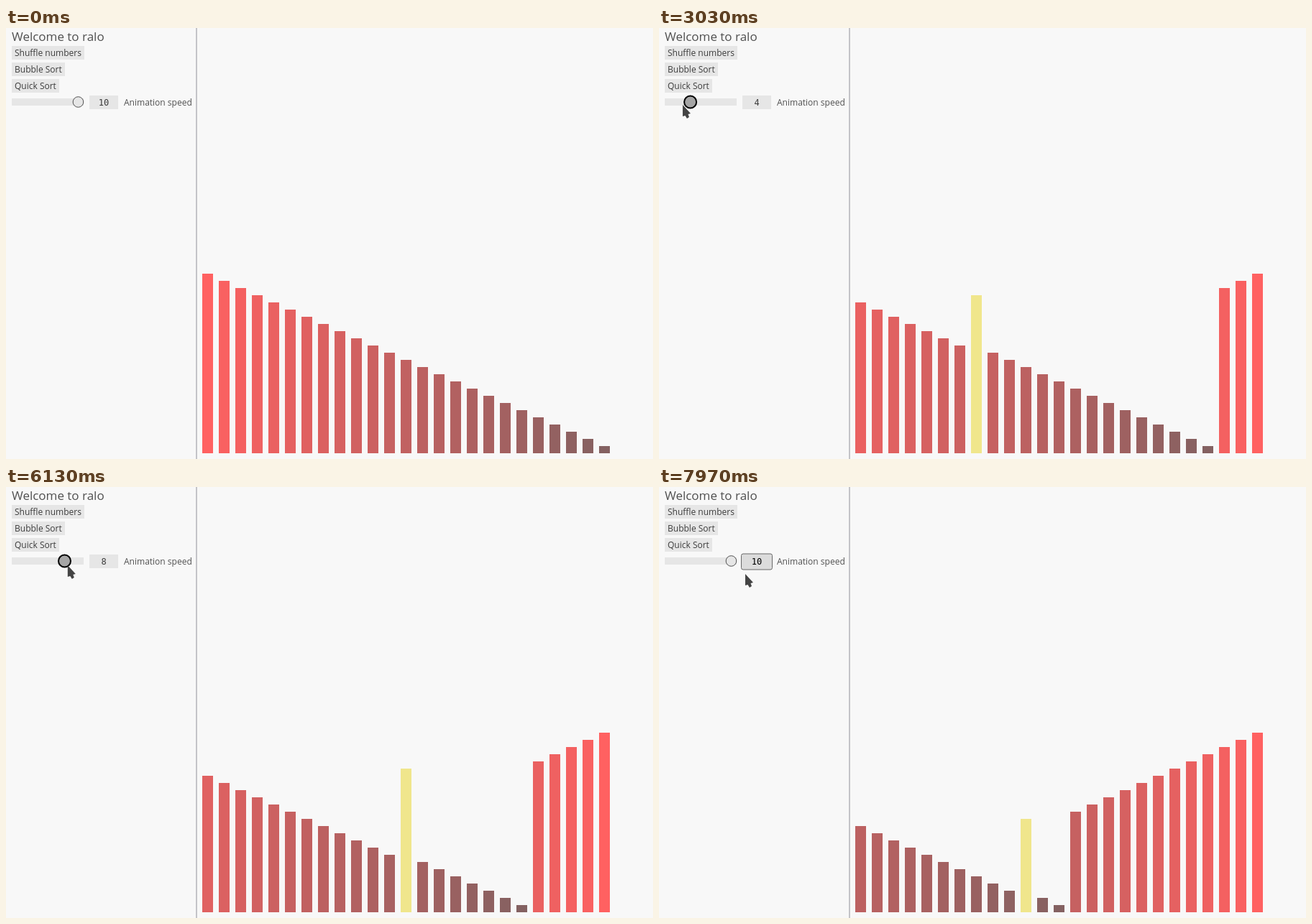
These frames come from a looping animation (900 by 600 pixels, 8 s). An HTML page with a canvas:

```html
<!DOCTYPE html>
<html lang="en">
<head>
<meta charset="utf-8">
<title>Sorting visualiser</title>
<style>
  html, body { margin: 0; width: 100%; height: 100%; overflow: hidden; background: #f8f8f8; }
  canvas { display: block; }
</style>
</head>
<body>
<canvas id="stage" width="900" height="600"></canvas>
<script>
const ctx = document.getElementById('stage').getContext('2d');
const LOOP = 8000, FRAME = 100 / 3, COUNT = 25;
const POINTER_IN = 230, SORT_START = 1875, DRAG_START = 2300, DRAG_END = 7700;
const LAG = 50; // the interface reacts slightly after the pointer
const NOTCH = 9.47, FIRST_NOTCH = 15.2;
const PAPER = '#f8f8f8', PANEL = '#e6e6e6', HOVER = '#dcdcdc', INK = '#505050';
const SANS = '"Open Sans", "Noto Sans", sans-serif';
const MONO = '"DejaVu Sans Mono", monospace';

// Pointer path as [time, position]: enter, press Bubble Sort, drag the slider, leave
const pathX = [
  [230, 260], [1030, 104], [1850, 46], [2060, 97], [2580, 97], [3033, 33], [3146, 17],
  [4600, 26], [5150, 42], [5320, 72], [6030, 76], [6133, 85.8], [7167, 89], [7250, 98],
  [7700, 102], [7967, 120]
];
const pathY = [
  [230, 0], [1030, 57], [1850, 57], [2060, 107], [3033, 107], [4600, 103], [6133, 109],
  [7700, 111], [7967, 121]
];

function along(path, t) {
  const next = path.findIndex(([time]) => time > t);
  if (next === 0) return path[0][1];
  if (next < 0) return path[path.length - 1][1];
  const [t0, a] = path[next - 1], [t1, b] = path[next];
  return a + (b - a) * (t - t0) / (t1 - t0);
}

const pointerAt = t => ({ x: along(pathX, t), y: along(pathY, t) });

function speedAt(t) {
  if (t < DRAG_START) return 10;
  const notch = Math.round((pointerAt(t - LAG).x - FIRST_NOTCH) / NOTCH);
  return Math.max(1, Math.min(10, notch + 1));
}

// Swaps done by each millisecond; every swap waits longer at a lower speed
const swaps = [0];
for (let t = 0; t < LOOP; t++) {
  const rate = t < SORT_START ? 0 : 1 / (111.5 - 10 * speedAt(t));
  swaps.push(swaps[t] + rate);
}

function rect(x, y, w, h, color) {
  ctx.fillStyle = color;
  ctx.fillRect(x, y, w, h);
}

function fillAndStroke(fill, stroke, width) {
  ctx.fillStyle = fill;
  ctx.fill();
  ctx.strokeStyle = stroke;
  ctx.lineWidth = width;
  ctx.stroke();
}

function text(str, x, y, size, color = INK, family = SANS, align = 'left') {
  ctx.font = `${size}px ${family}`;
  ctx.textAlign = align;
  ctx.fillStyle = color;
  ctx.fillText(str, x, y);
}

function box(x, y, w, hovered) {
  if (!hovered) return rect(x, y, w, 19, PANEL);
  ctx.beginPath();
  ctx.roundRect(x - 1.5, y - 1, w + 3, 22, 2.5);
  fillAndStroke(HOVER, '#696969', 1);
}

function drawButton(label, row, hand) {
  const y = 25 + 23 * row;
  ctx.font = `12px ${SANS}`;
  const width = Math.round(ctx.measureText(label).width) + 8;
  const hovered = hand && hand.x >= 8 && hand.x <= 8 + width && hand.y >= y && hand.y <= y + 19;
  box(8, y, width, hovered);
  text(label, 12, y + 14, 12, hovered ? '#000' : '#3c3c3c');
}

function drawSlider(t, hand) {
  const speed = speedAt(t);
  const x = FIRST_NOTCH + NOTCH * (speed - 1);
  const dragging = t >= DRAG_START && t < DRAG_END;
  const hovered = dragging || hand && Math.hypot(hand.x - x, hand.y - 103) < 13;
  rect(8, 98, 100, 10, PANEL);
  ctx.beginPath();
  ctx.arc(x, 103, hovered ? 8.5 : 7.3, 0, 2 * Math.PI);
  if (dragging) fillAndStroke('#a5a5a5', '#000', 2);
  else if (hovered) fillAndStroke(HOVER, '#101010', 1.5);
  else fillAndStroke(PANEL, INK, 1);

  const boxHovered = hand && !dragging && hand.y > 90 && hand.x > 112;
  box(116, 94, 40, boxHovered);
  text(speed, 136, 108, 12, boxHovered ? '#000' : '#3c3c3c', MONO, 'center');
  text('Animation speed', 164, 108, 12);
}

// Bubble sort of a descending list: each pass carries its largest value rightwards
function drawBars(t) {
  let largest = COUNT, position = Math.floor(swaps[Math.round(t)]);
  while (largest > 1 && position >= largest - 1) position -= --largest;
  for (let i = 0; i < COUNT; i++) {
    const carried = i === position;
    const value = i >= largest ? i + 1
      : carried ? largest
      : i < position ? largest - 1 - i : largest - i;
    const color = carried && t >= SORT_START ? '#f0e68c' : `rgb(${127 + 5.1 * value}, 97, 97)`;
    rect(273 + 23 * i, 592 - 10 * value, 15, 10 * value, color);
  }
}

function drawPointer({ x, y }) {
  const outline = [[0, 0], [11, 12], [7.5, 13], [9, 17], [6, 19], [3.5, 15], [0, 16]];
  ctx.beginPath();
  outline.forEach(([dx, dy]) => ctx.lineTo(x + dx, y + dy));
  ctx.fillStyle = '#444';
  ctx.fill();
}

function draw(now) {
  const t = Math.floor((now % LOOP + 4) / FRAME) * FRAME;
  const visible = t >= POINTER_IN;
  const hand = visible && pointerAt(t - LAG);
  rect(0, 0, 900, 600, PAPER);
  text('Welcome to ralo', 8, 18, 17);
  ['Shuffle numbers', 'Bubble Sort', 'Quick Sort'].forEach((label, row) => drawButton(label, row, hand));
  drawSlider(t, hand);
  rect(264, 0, 2, 600, '#c4c4c8');
  drawBars(t);
  if (visible) drawPointer(pointerAt(t));
}

let origin;
function tick(now) {
  origin ??= now;
  draw(now - origin);
  requestAnimationFrame(tick);
}
draw(0);
requestAnimationFrame(tick);
</script>
</body>
</html>
```
